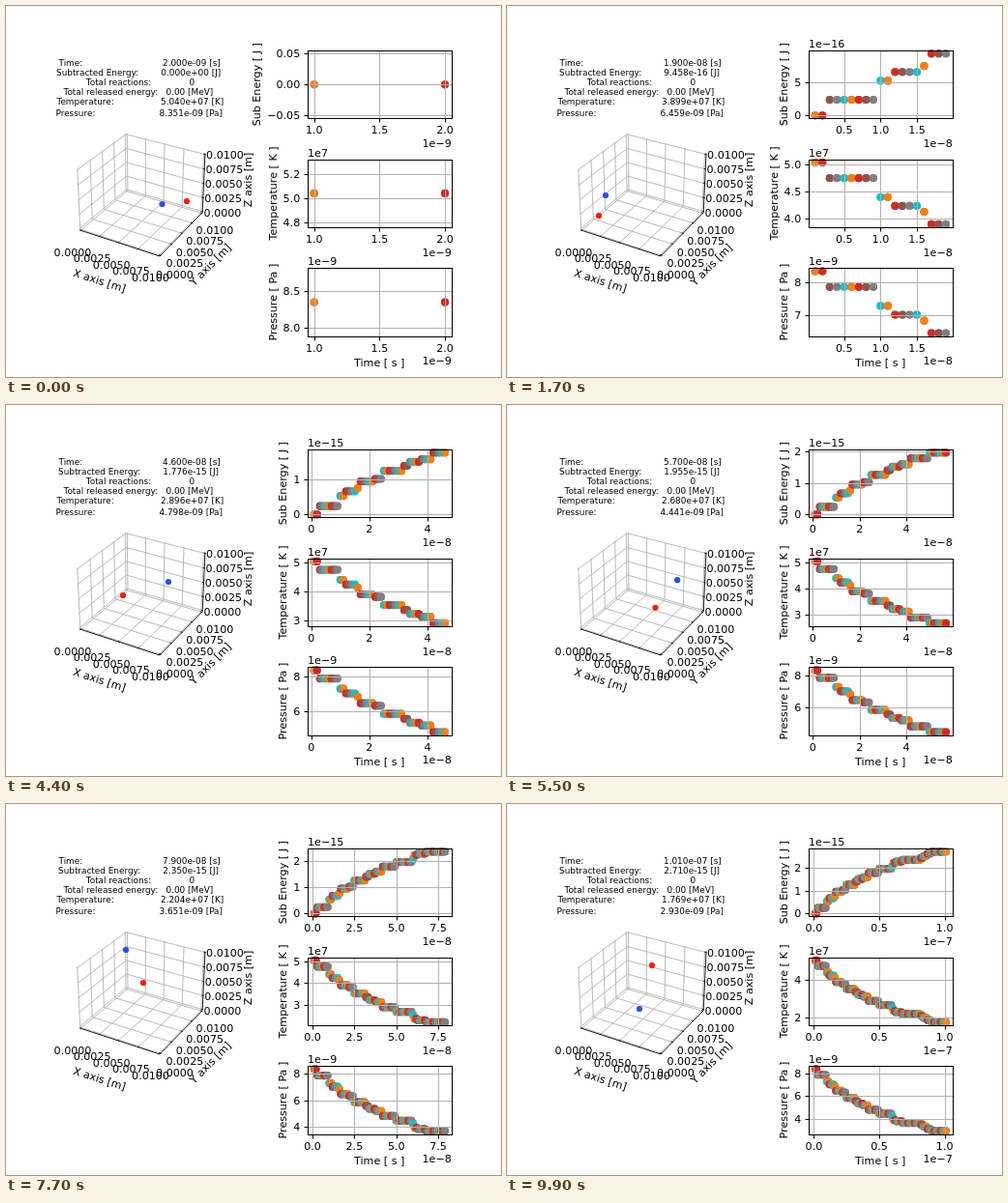
Animation, 512 px wide and 384 px high, one loop 10 s. Source, as an HTML page with a canvas:

```html
<!DOCTYPE html>
<html lang="en">
<head>
<meta charset="utf-8">
<title>Particle box</title>
<style>
  html, body { margin: 0; width: 100%; height: 100%; overflow: hidden; background: #fff; }
  canvas { display: block; width: 512px; height: 384px; }
</style>
</head>
<body>
<canvas id="stage" width="512" height="384"></canvas>
<script>
const ctx = document.getElementById('stage').getContext('2d');
const FACE = '"DejaVu Sans", sans-serif';
const BODY = '11.11px ' + FACE, SMALL = '8.89px ' + FACE;
const STEP = 100, COUNT = 100;

// Energy lost to the walls (1e-16 J), from the given nanosecond on
const LOSS = [[1, 0], [3, 2.4], [10, 5.3], [12, 6.65], [16, 7.55], [17, 9.458], [22, 10.2],
  [25, 12.523], [32, 13.95], [34, 15.1], [38, 15.85], [42, 17.763], [50, 19.55], [60, 20.7],
  [61, 22.2], [63, 22.75], [68, 23.5], [82, 24.3], [84, 25.2], [87, 26.2], [90, 27.103]];
const energy = t => LOSS.reduce((e, [from, v]) => t >= from ? v : e, 0);
const temp = t => 5.0403 - 0.12071 * energy(t);
const press = t => temp(t) * 1.65678;

// Flight paths as [ns, x, y], straight between bounces
const RED = [[2, 187, 202], [3, 190, 201], [10, 142, 221], [17, 88, 213], [19, 95, 217],
  [30, 177, 222], [32, 185, 221], [46, 121, 197], [48, 113, 194], [64, 185, 222],
  [68, 167, 223], [79, 142, 185], [84, 127, 168], [101, 150, 167]];
const BLUE = [[2, 161.5, 205], [3, 158, 209], [10, 174, 168], [17, 98, 207], [19, 102, 196],
  [22, 106, 175], [25, 138, 160], [30, 139, 185], [34, 126, 204], [42, 184, 163],
  [46, 168, 183], [50, 158, 205], [60, 184, 171], [68, 132, 206], [71, 114, 217],
  [79, 124, 151], [82, 127, 142], [90, 148, 162], [101, 137, 212]];

// Each sample is a disc on top of an equal one in the preceding cycle colour
const DISCS = [['#1f77b4', '#ff7f0e'], ['#2ca02c', '#d62728'], ['#9467bd', '#8c564b'],
  ['#e377c2', '#7f7f7f'], ['#bcbd22', '#17becf']];

const BOX = { left: 312, right: 460.8, height: 70.4 };
const PLOTS = [
  { top: 46.08, name: 'Sub Energy [ J ]', value: energy, exp: -16 },
  { top: 158.72, name: 'Temperature [ K ]', value: temp, exp: 7 },
  { top: 271.36, name: 'Pressure [ Pa ]', value: press, exp: -9 }
];

const snap = v => Math.floor(v + 0.5) + 0.5;
const lerp = (a, b, k) => a + (b - a) * k;

function text(s, x, y, align = 'left', font = BODY) {
  ctx.font = font;
  ctx.textAlign = align;
  ctx.fillStyle = '#000';
  ctx.fillText(s, x, y);
}

function turned(s, x, y, angle) {
  ctx.save();
  ctx.translate(x, y);
  ctx.rotate(angle);
  text(s, 0, 0, 'center');
  ctx.restore();
}

function line(points, color, width = 0.89) {
  ctx.strokeStyle = color;
  ctx.lineWidth = width;
  ctx.beginPath();
  points.forEach(p => ctx.lineTo(p[0], p[1]));
  ctx.stroke();
}

function disc(x, y, r, color) {
  ctx.fillStyle = color;
  ctx.beginPath();
  ctx.arc(x, y, r, 0, 2 * Math.PI);
  ctx.fill();
}

function sci(v) {
  const [m, e] = v.toExponential(3).split('e');
  return m + 'e' + e[0] + e.slice(1).padStart(2, '0');
}

function at(path, t) {
  const i = Math.max(1, path.findIndex(p => p[0] >= t));
  const a = path[i - 1], b = path[i], k = (t - a[0]) / (b[0] - a[0]);
  return [lerp(a[1], b[1], k), lerp(a[2], b[2], k)];
}

// Perspective view of the unit cube centred on 0
function project(x, y, z) {
  x *= 1.1429; y *= 1.1429; z *= 0.8571;
  const depth = 10 - (0.433 * x - 0.75 * y + 0.5 * z);
  return [140.7 + 806 * (0.866 * x + 0.5 * y) / depth,
    192.3 - 806 * (-0.25 * x + 0.433 * y + 0.866 * z) / depth];
}

function drawCube(n) {
  const K = 0.517, inner = K - 0.017, outer = K + 0.008;
  const path = (pts, color) => line(pts.map(p => project(...p)), color);
  const ticks = [-0.5, -0.25, 0, 0.25, 0.5];
  for (const v of ticks) {
    path([[v, -K, -K], [v, K, -K], [v, K, K]], '#b0b0b0');
    path([[K, v, -K], [-K, v, -K], [-K, v, K]], '#b0b0b0');
    path([[K, K, v], [-K, K, v], [-K, -K, v]], '#b0b0b0');
  }
  path([[-K, -K, -K], [K, -K, -K], [K, K, -K], [K, K, K]], '#000');
  ticks.forEach((v, i) => {
    path([[v, -inner, -K], [v, -outer, -K]], '#000');
    path([[inner, v, -K], [outer, v, -K]], '#000');
    path([[inner, K, v], [outer, K, v]], '#000');
    const s = (i * 0.0025).toFixed(4), k = i / 4;
    text(s, lerp(69, 149.5, k), lerp(258.5, 285, k), 'center');
    text(s, lerp(174.5, 216, k), lerp(281.5, 236, k), 'center');
    text(s, lerp(224, 226.5, k), lerp(218, 158, k), 'center');
  });
  turned('X axis [m]', 95.5, 288, 0.31);
  turned('Y axis [m]', 214, 270.5, -0.79);
  turned('Z axis [m]', 253.5, 180, -Math.PI / 2);
  disc(...at(RED, n), 3.1, '#fa1e0a');
  disc(...at(BLUE, n), 3.1, '#2a52dc');
}

// Largest round step that leaves at least two ticks in view
function locate(lo, hi, bins) {
  const steps = [];
  for (let k = -3; k < 4; k++) for (const m of [1, 2, 2.5, 5]) steps.push(m * 10 ** k);
  let i = steps.findIndex(s => s >= (hi - lo) / bins);
  for (;; i--) {
    const step = steps[i], vals = [];
    for (let j = Math.ceil(lo / step); j * step <= hi; j++) vals.push(j * step);
    if (vals.length > 1 || i === 0) return { step, vals };
  }
}

function scale(min, max, bins, exp) {
  if (min === max) {
    const pad = Math.abs(min) * 0.05 || 0.05;
    if (min === 0) exp = 0;
    min -= pad;
    max += pad;
  }
  const margin = (max - min) * 0.05, lo = min - margin, hi = max + margin;
  const { step, vals } = locate(lo, hi, bins);
  const order = exp ? Math.floor(Math.log10(vals[vals.length - 1]) + 1e-9) : 0;
  const unit = 10 ** order;
  let digits = 0;
  while (Math.abs(step / unit * 10 ** digits - Math.round(step / unit * 10 ** digits)) > 1e-6) digits++;
  const labels = vals.map(v => {
    const s = Math.abs(v / unit).toFixed(digits);
    return v < -1e-9 ? '\u2212' + s : s;
  });
  const offset = exp ? '1e' + String(exp + order).replace('-', '\u2212') : '';
  return { vals, labels, offset, pos: v => (v - lo) / (hi - lo) };
}

function drawPlot(plot, n) {
  const { left, right, height } = BOX, top = plot.top, bottom = top + height;
  const data = Array.from({ length: n }, (_, i) => plot.value(i + 1));
  const xs = scale(1, n, 4, -9);
  const ys = scale(Math.min(...data), Math.max(...data), 3, plot.exp);
  const px = v => left + xs.pos(v) * (right - left);
  const py = v => bottom - ys.pos(v) * height;
  const l = snap(left), r = snap(right), t = snap(top), b = snap(bottom);

  data.forEach((v, i) => DISCS[i % 5].forEach(c => disc(px(i + 1), py(v), 4.1, c)));

  xs.vals.forEach((v, i) => {
    const x = snap(px(v));
    line([[x, t], [x, b]], '#b0b0b0', 1);
    line([[x, b], [x, b + 4]], '#000', 1);
    text(xs.labels[i], px(v), Math.round(bottom + 15.8), 'center');
  });
  ctx.font = BODY;
  const wide = Math.max(...ys.labels.map(s => ctx.measureText(s).width));
  ys.vals.forEach((v, i) => {
    const y = snap(py(v));
    line([[l, y], [r, y]], '#b0b0b0', 1);
    line([[l - 4, y], [l, y]], '#000', 1);
    text(ys.labels[i], left - 7.8, Math.round(py(v) + 4), 'right');
  });
  ctx.strokeStyle = '#000';
  ctx.strokeRect(l, t, r - l, b - t);

  text(xs.offset, right, Math.round(bottom + 29.6), 'right');
  text(ys.offset, left, Math.round(top - 3.2));
  turned(plot.name, left - 14.5 - wide, top + height / 2, -Math.PI / 2);
}

function drawReadout(n) {
  const e = energy(n), shift = e ? 0 : 2;
  const rows = [
    ['Time:', 54.5, sci(n * 1e-9) + ' [s]', 162, 62],
    ['Subtracted Energy:', 54 - shift, sci(e * 1e-16) + ' [J]', 162.3 - shift, 72],
    ['Total reactions:', 82.8, '0', 189.5, 82],
    ['Total released energy:', 59.5, '0.00 [MeV]', 165.5, 92],
    ['Temperature:', 52.5, sci(temp(n) * 1e7) + ' [K]', 160, 102],
    ['Pressure:', 51.5, sci(press(n) * 1e-9) + ' [Pa]', 158.5, 114]
  ];
  for (const [name, x, value, vx, y] of rows) {
    text(name, x, y, 'left', SMALL);
    text(value, vx, y, 'left', SMALL);
  }
}

function draw(n) {
  ctx.fillStyle = '#fff';
  ctx.fillRect(0, 0, 512, 384);
  drawReadout(n);
  drawCube(n);
  PLOTS.forEach(p => drawPlot(p, n));
  text('Time [ s ]', 386.2, 373, 'center');
}

let start = null;
function tick(now) {
  if (start === null) start = now;
  draw(2 + Math.floor(Math.max(0, now - start) / STEP) % COUNT);
  requestAnimationFrame(tick);
}
draw(2);
requestAnimationFrame(tick);
</script>
</body>
</html>
```
